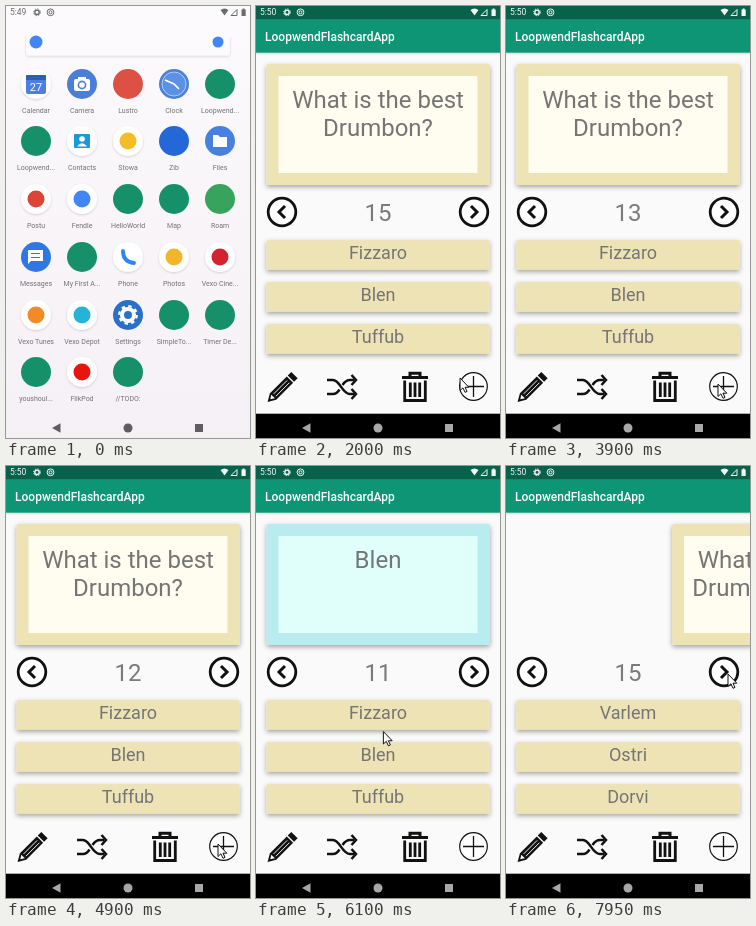
These frames come from a looping animation (244x432 px, 8000 ms). An HTML page:

```html
<!DOCTYPE html>
<html lang="en">
<head>
<meta charset="utf-8">
<title>Flashcards</title>
<style>
html, body { margin: 0; width: 100%; height: 100%; overflow: hidden; background: #fafafa; }
#stage { position: relative; width: 244px; height: 432px; overflow: hidden; }
svg { position: absolute; left: 0; top: 0; display: block; }
text { font-family: Roboto, sans-serif; }
.mid { text-anchor: middle; }
#card { transform-origin: 122px 118.5px; }
</style>
</head>
<body>
<div id="stage"></div>
<script>
const LOOP = 8000;
const GREEN = '#0f9575', DARK = '#08614b', SAND = '#ede3b4', GREY = '#757575';

const rect = (x, y, w, h, fill, more = '') =>
  `<rect x="${x}" y="${y}" width="${w}" height="${h}" fill="${fill}" ${more}/>`;
const disc = (x, y, r, fill, more = '') =>
  `<circle cx="${x}" cy="${y}" r="${r}" fill="${fill}" ${more}/>`;
const path = (d, fill, more = '') => `<path d="${d}" fill="${fill}" ${more}/>`;
const line = (d, width, color = '#111', more = '') =>
  path(d, 'none', `stroke="${color}" stroke-width="${width}" ${more}`);
const label = (s, x, y, size, fill, more = '') =>
  `<text x="${x}" y="${y}" font-size="${size}" fill="${fill}" ${more}>${s}</text>`;
const mid = (s, x, y, size, fill, more = '') => label(s, x, y, size, fill, `class="mid" ${more}`);
const group = (id, body, more = '') => `<g id="${id}" ${more}>${body}</g>`;
const layer = (id, body) => `<svg id="${id}" width="244" height="432" viewBox="0 0 244 432">${body}</svg>`;

// Launcher icons, drawn around 0,0
const plain = c => disc(0, 0, 15, c);
const dot = c => disc(0, 0, 15, '#fff', 'filter="url(#soft)"') + disc(0, 0, 8.5, c);
const app = plain('#169069');
const glyphs = {
  calendar: dot('none') + rect(-10, -9, 20, 19, '#4a80df', 'rx="2"') + rect(-10, -9, 20, 5, '#2f5fb3', 'rx="1"') +
    mid('27', 0, 6.5, 11, '#fff'),
  camera: plain('#4a7fd6') + rect(-8, -5, 16, 12, '#fff', 'rx="2"') + rect(-4, -7, 8, 4, '#fff') +
    disc(0, 1, 4.4, '#4a7fd6') + disc(0, 1, 2.8, '#fff'),
  clock: plain('#4a82d8') + disc(0, 0, 12, '#5b92e6', 'stroke="#d8e4f6" stroke-width=".7"') +
    line('M-9-4L0 0L5 5', 1.5, '#fff'),
  contacts: dot('none') + rect(-8, -7, 16, 14, '#1a9ad8', 'rx="1"') + disc(0, -2, 2.8, '#fff') +
    path('M-5 5.500Q0-1 5 5.500z', '#fff'),
  files: plain('#4680e0') + path('M-7-6h5l2 2h7v10h-14z', '#fff'),
  messages: plain('#2f78e4') + path('M-8-7H7V4H-5l-3 3z', '#fff') + line('M-5-3.500H4M-5 .5H4', 1.2, '#2f78e4'),
  phone: dot('none') + line('M-5-6Q-5 5 6 6', 3.8, '#2c86f0', 'stroke-linecap="round"'),
  settings: plain('#2a6fc9') + disc(0, 0, 6, 'none', 'stroke="#fff" stroke-width="4"') +
    disc(0, 0, 8.8, 'none', 'stroke="#fff" stroke-width="2.2" stroke-dasharray="3.456"'),
};
const icons = [
  ['Calendar', glyphs.calendar], ['Camera', glyphs.camera], ['Lustro', plain('#dd5144')],
  ['Clock', glyphs.clock], ['Loopwend...', app],
  ['Loopwend...', app], ['Contacts', glyphs.contacts], ['Stowa', dot('#f4bd27')],
  ['Zib', plain('#2468d8')], ['Files', glyphs.files],
  ['Postu', dot('#db4437')], ['Fendle', dot('#4285f4')], ['HelloWorld', app],
  ['Map', app], ['Roam', plain('#38a35c')],
  ['Messages', glyphs.messages], ['My First A...', app], ['Phone', glyphs.phone],
  ['Photos', dot('#f2b52b')], ['Vexo Cine...', dot('#d3232f')],
  ['Vexo Tunes', dot('#f28a25')], ['Vexo Depot', dot('#25b5d4')], ['Settings', glyphs.settings],
  ['SimpleTo...', app], ['Timer De...', app],
  ['youshoul...', app], ['FlikPod', dot('#e8150f')], ['//TODO:', app],
];
const rows = [78, 135, 193, 251, 309, 366];
const launcher =
  rect(20, 24, 204, 25.5, '#fcfafc', 'rx="3" filter="url(#soft)"') + rect(16, 13, 212, 18, '#fcfafc') +
  disc(30, 36, 6.5, '#4285f4') + disc(212, 36, 5.5, '#4285f4') +
  icons.map(([name, art], i) =>
    `<g transform="translate(${30 + i % 5 * 46} ${rows[i / 5 | 0]})">${art}${mid(name, 0, 29, 7, '#747176')}</g>`).join('');

// Status and navigation bars take the current colour
const status =
  label('5:49', 4, 9.3, 8.5, 'currentColor', 'id="time"') +
  disc(31, 6.3, 2.2, 'none', 'stroke="currentColor" stroke-width="1.4"') +
  disc(31, 6.3, 3.4, 'none', 'stroke="currentColor" stroke-dasharray="1.335"') +
  disc(44.5, 6.3, 3.4, 'none', 'stroke="currentColor"') + disc(44.5, 6.3, 1.5, 'none', 'stroke="currentColor"') +
  path('M214.500 4Q218.500 1 222.500 4L218.500 9.500zM235.500 3.500h1.200v-1h1.800v1h1.200V10H235.500z', 'currentColor') +
  line('M225 9.500h6V3.500z', 1, 'currentColor');
const nav = path('M46 422L54.500 417.300V426.700z', 'currentColor') + disc(122, 422, 4.5, 'currentColor') +
  rect(189, 418, 8, 8, 'currentColor');

const ring = (x, y, w) => disc(x, y, 13.8, '#fff', `stroke="#111" stroke-width="${w}"`);
const option = i => rect(10.5, 234.2 + 42 * i, 223, 29.6, SAND, 'filter="url(#drop)"') +
  mid('', 122, 253.3 + 42 * i, 18, GREY, `id="opt${i}"`);

const pencil = '<g transform="translate(25.800 381.800) rotate(45) scale(1.12)">' +
  path('M-4-16h8v4.500h-8zM-4-10.300h8V11L0 18L-4 11z', '#111') +
  line('M-1.300-8V9M1.600-8V9', 0.8, '#fafafa') + path('M-2.300 11h4.600L0 14.500z', '#fafafa') + '</g>';
const shuffle = line('M71 374H77C84 374 86 388 94 388H98M71 388H77C80 388 82 386 83.500 383.500M86.500 379C88.500 376 90 374 94 374H98', 2.5) +
  line('M95.500 369L100 374L95.500 379M95.500 383L100 388L95.500 393', 2.5);
const trash = line('M146 371.500H172M154 370V367.300H164V370', 3) +
  line('M148.700 374.500V394.500H169.300V374.500M154.300 376.500V391M159 376.500V391M163.700 376.500V391', 2.8);

const screen =
  rect(0, 0, 244, 432, '#fafafa') + rect(0, 0, 244, 13.5, DARK) + rect(0, 407.7, 244, 24.3, '#000') +
  group('content',
    rect(0, 13.5, 244, 33.2, GREEN, 'filter="url(#soft)"') + rect(0, 0, 244, 13.5, DARK) +
    label('LoopwendFlashcardApp', 9, 35, 12, '#fff', 'font-weight="500"') +
    ring(26, 206, 2.8) + line('M29 200L23 206L29 212', 3) +
    ring(218, 206, 2.8) + line('M215 200L221 206L215 212', 3) +
    mid('', 122, 214.5, 24, '#7b7b7b', 'id="count"') +
    [0, 1, 2].map(option).join('') + pencil + shuffle + trash +
    ring(217.5, 380.5, 1.2) + line('M217.500 370V391M207 380.500H228', 1.3));

const defs = `<defs>
  <linearGradient id="wall" x2="0" y2="1"><stop stop-color="#fcfafc"/><stop offset="1" stop-color="#f5f0f5"/></linearGradient>
  <filter id="soft" x="-30%" y="-30%" width="160%" height="160%"><feDropShadow dx="0" dy="1" stdDeviation="1" flood-opacity=".16"/></filter>
  <filter id="drop" x="-10%" y="-30%" width="120%" height="180%"><feDropShadow dx="0" dy="2" stdDeviation="2.5" flood-opacity=".36"/></filter>
</defs>`;

const stage = document.getElementById('stage');
stage.innerHTML =
  layer('base', defs + group('home', rect(0, 0, 244, 432, 'url(#wall)') + group('icons', launcher)) +
    group('window', rect(0, 0, 1, 1, DARK, 'id="head"') + rect(0, 0, 1, 1, '#fcfcfc', 'id="body"')) +
    group('app', screen) + group('status', status) + group('nav', nav)) +
  layer('card', rect(10.5, 58, 223.5, 121, SAND, 'id="edge" rx="2" filter="url(#drop)"') +
    rect(22.5, 70, 199, 97, '#fffdf0', 'id="face"') +
    mid('', 122, 102.3, 24, GREY, 'id="line0"') + mid('', 122, 130.3, 24, GREY, 'id="line1"')) +
  layer('top', group('cursor', path('M0 0V12.500L2.900 9.800L5 14.300L7 13.400L5 9.200H8.800z', '#fff', 'stroke="#111"')));

const el = {};
document.querySelectorAll('[id]').forEach(e => el[e.id] = e);
const set = (id, attrs) => { for (const k in attrs) el[id].setAttribute(k, attrs[k]); };
const show = (id, on) => { el[id].style.display = on ? '' : 'none'; };
const say = (id, s) => { if (el[id].textContent !== s) el[id].textContent = s; };
const span = (t, a, b) => Math.min(1, Math.max(0, (t - a) / (b - a)));
const ease = p => (1 - Math.cos(Math.PI * p)) / 2;

const OPEN = 900, READY = 1400, FLIP = 5160, NEXT = 6530, ENTER = 7540;

// time, x, y
const trail = [
  [100, 110, 436], [750, 25, 137], [1250, 25, 137], [1980, 204, 372], [2400, 212, 378],
  [4900, 212, 378], [5050, 207, 352], [5320, 122, 143], [5880, 122, 143],
  [6160, 128, 280], [6240, 128, 280], [6480, 222, 208], [8000, 222, 208],
];
function cursorAt(t) {
  const i = trail.findIndex(k => k[0] > t);
  if (i < 1) return trail[0].slice(1);
  const [a, x, y] = trail[i - 1], [b, u, v] = trail[i];
  const p = ease(span(t, a, b));
  return [x + (u - x) * p, y + (v - y) * p];
}

function drawLaunch(t) {
  const p = ease(span(t, OPEN, 1200));
  set('icons', { transform: `translate(0 ${-36 * p})`, opacity: 1 - 0.7 * p });
  show('window', p > 0);
  const x = 14 * (1 - p ** 3), y = 120 * (1 - p * p);
  const width = 30 + 214 * p ** 0.88, height = 30 + 402 * p ** 1.05;
  const bar = 3 + 10.5 * p, r = 28 * (1 - p);
  set('head', { x, y, width, height: Math.min(height, bar + 2 * r), rx: r });
  set('body', { x, y: y + bar, width, height: height - bar, rx: r / 8 });
}

function drawCard(t) {
  const turn = span(t, FLIP, FLIP + 400);
  const back = turn >= 0.5 && t < NEXT;
  const angle = turn < 0.5 ? 90 * ease(turn * 2) : -90 * (1 - ease(turn * 2 - 1));
  const shift = t < ENTER ? -244 * ease(span(t, NEXT, NEXT + 1000)) : 244 * (1 - ease(span(t, ENTER, ENTER + 1000)));
  el.card.style.transform = turn > 0 && turn < 1
    ? `perspective(350px) rotateY(${angle}deg)` : `translateX(${shift}px)`;
  set('edge', { fill: back ? '#b9ecef' : SAND });
  set('face', { fill: back ? '#e0fffb' : '#fffdf0' });
  say('line0', back ? 'Blen' : 'What is the best');
  say('line1', back ? '' : t < ENTER ? 'Drumbon?' : 'Drumbon region?');
}

function draw(t) {
  const inApp = t >= 1200, ready = t >= READY;
  show('home', !inApp);
  show('app', inApp);
  show('content', ready);
  show('card', ready);
  if (inApp) show('window', false); else drawLaunch(t);
  if (ready) drawCard(t);
  el.status.style.color = inApp ? '#f4f8f6' : '#6c6a6d';
  el.nav.style.color = inApp ? '#a8a8a8' : '#5f5d61';
  say('time', t < 500 ? '5:49' : '5:50');

  say('count', String(t >= 7560 ? 15 : 15 - Math.max(0, Math.floor((t - 1500) / 1000))));
  const choices = t < 6740 ? ['Fizzaro', 'Blen', 'Tuffub']
    : t < 7560 ? ['Red', 'Blue', 'Professor Gim'] : ['Varlem', 'Ostri', 'Dorvi'];
  choices.forEach((s, i) => say('opt' + i, s));

  set('cursor', { transform: `translate(${cursorAt(t)})` });
}

const start = performance.now();
function tick() {
  draw((performance.now() - start) % LOOP);
  requestAnimationFrame(tick);
}
tick();
</script>
</body>
</html>
```
